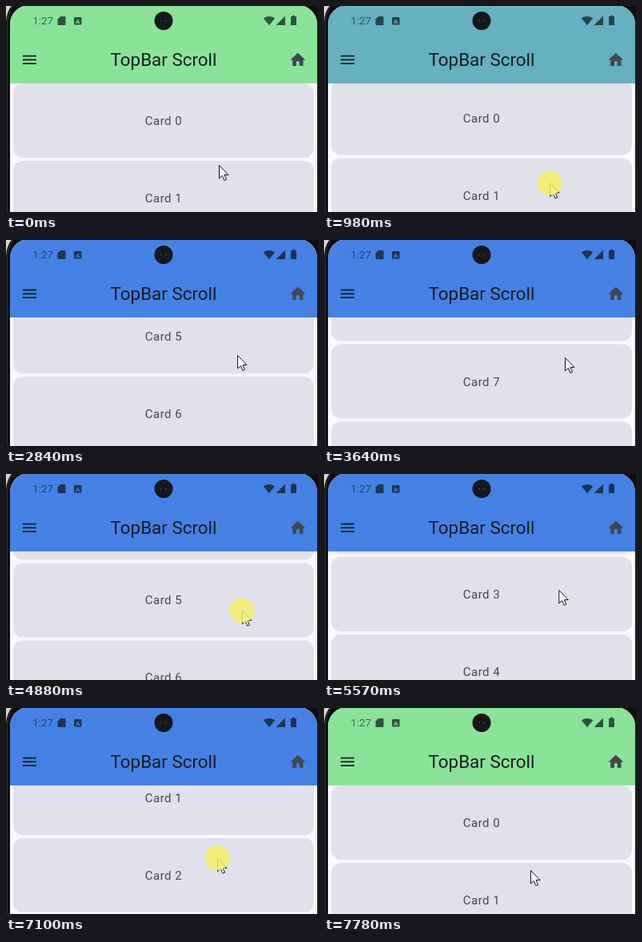
These frames come from a looping animation (390 px wide and 258 px high, 8.18 s). An HTML page:

```html
<!DOCTYPE html>
<html lang="en">
<head>
<meta charset="utf-8">
<title>TopBar Scroll</title>
<style>
  html, body { margin: 0; width: 100%; height: 100%; overflow: hidden; background: #0d0d0f; }
  svg { display: block; width: 390px; height: 258px; font-family: Roboto, sans-serif; }
</style>
</head>
<body>
<svg viewBox="0 0 390 258">
  <defs>
    <clipPath id="screen"><rect x="5" y="-1" width="384" height="320" rx="24"/></clipPath>
    <radialGradient id="ripple" gradientUnits="userSpaceOnUse" cx="240" cy="240" r="235">
      <stop offset=".45" stop-opacity=".09"/>
      <stop offset="1" stop-opacity="0"/>
    </radialGradient>
  </defs>
  <path d="M0 0H7Q1 7 0 20Z" fill="#d4d4d6"/>
  <path d="M1.5 258V26Q1.5 9 9 0" fill="none" stroke="#39393c"/>
  <g clip-path="url(#screen)">
    <rect width="390" height="258" fill="#faf8ff"/>
    <g id="list" fill="#44464f" font-size="15" letter-spacing=".5" text-anchor="middle"></g>
    <rect id="bar" width="390" height="97"/>
  </g>

  <g fill="#101418" opacity=".7">
    <text x="33.2" y="23" font-size="13.4" opacity=".85">1:27</text>
    <path d="M68 13h5.500q1 0 1 1v9q0 1-1 1h-8q-1 0-1-1v-6.500z"/>
    <rect x="85" y="14" width="9.500" height="9.500" rx="1"/>
    <path d="M329 24.300L321.700 15.300Q329 10.500 336.300 15.300z"/>
    <path d="M349 12.500v11.500h-11.500z"/>
    <path d="M358 13v-1.200h3v1.200h2v11h-7v-11z"/>
  </g>
  <text id="letter" x="89.800" y="21.800" font-size="8" font-weight="700" text-anchor="middle">A</text>
  <circle cx="197" cy="18.500" r="11.500" fill="#15181a"/>
  <path d="M193 18.500h8" stroke="#3c4145" stroke-width="1.500" stroke-dasharray="2 4"/>

  <path transform="translate(18 56) scale(.95)" fill="#1a1b20" d="M3 6h18v2H3zM3 11h18v2H3zM3 16h18v2H3z"/>
  <text x="197" y="75" font-size="22.400" text-anchor="middle" fill="#1a1b20">TopBar Scroll</text>
  <path transform="translate(353.400 56) scale(.95)" fill="#44464f" d="M10 20v-6h4v6h5v-8h3L12 3 2 12h3v8z"/>

  <g id="pointer">
    <path d="M.5 .5V17L4.300 13.500 6.900 19.500 9.500 18.300 7 12.500H12Z" fill="#fff" stroke="#111"/>
    <circle id="press" r="15.500" fill="#f6f060" opacity=".82"/>
  </g>
</svg>
<script>
const LOOP = 8180, DRAG = 250, FLING = 620, PITCH = 97;
const green = [137, 228, 152], blue = [69, 129, 229];
const home = [266, 199];

// Each swipe: press time, scroll distance, press point, release point
const swipes = [
  [850, 30, [280, 240], [284, 205]],
  [1400, 218, [290, 255], [301, 198]],
  [2130, 259.7, [303, 230], [289, 144]],
  [3100, 144.3, [303, 210], [301, 147]],
  [4330, -183, [303, 136], [290, 190]],
  [4820, -185, [296, 165], [288, 205]],
  [5650, -127, [295, 126], [277, 161]],
  [6930, -157, [283, 140], [258, 203]],
];

const $ = id => document.getElementById(id);
const set = (id, name, value) => $(id).setAttribute(name, value);
const mix = (a, b, u) => a.map((v, i) => v + (b[i] - v) * u);

// Eased 0 to 1, beginning at start
function ramp(t, start, span) {
  const u = Math.min(1, Math.max(0, (t - start) / span));
  return u * u * (3 - 2 * u);
}

const card = (n, attrs) => `<rect x="9" y="${PITCH * (n + 1)}" width="376" height="93" rx="12" ${attrs}/>`;
let cards = '';
for (let n = 0; n < 10; n++)
  cards += card(n, 'fill="#e1e1ec"') + `<text x="197" y="${149 + PITCH * n}">Card ${n}</text>`;
$('list').innerHTML = cards + card(1, 'id="glow" fill="url(#ripple)"');

function draw(t) {
  let scroll = 0, point = home, pressed = false;
  for (const [start, distance, from, to] of swipes) {
    scroll += distance * ramp(t, start, FLING);
    point = mix(point, from, ramp(t, start - DRAG, DRAG));
    point = mix(point, to, ramp(t, start, DRAG));
    pressed ||= t >= start && t < start + DRAG;
  }
  set('list', 'transform', `translate(0 ${-scroll.toFixed(1)})`);
  set('pointer', 'transform', `translate(${point})`);
  set('press', 'visibility', pressed ? 'visible' : 'hidden');

  // The bar is blue while the list is away from its top
  const away = ramp(t, swipes[0][0], 250) - ramp(t, swipes.at(-1)[0] + FLING - 50, 250);
  const color = `rgb(${mix(green, blue, away).map(Math.round)})`;
  set('bar', 'fill', color);
  set('letter', 'fill', color);

  const touch = swipes[1][0];
  set('glow', 'opacity', ramp(t, touch, 200) - ramp(t, touch + 360, 250));
  set('ripple', 'r', 235 * ramp(t, touch, 350));
}

let begin;
function loop(now) {
  begin ??= now;
  draw((now - begin) % LOOP);
  requestAnimationFrame(loop);
}
requestAnimationFrame(loop);
</script>
</body>
</html>
```
